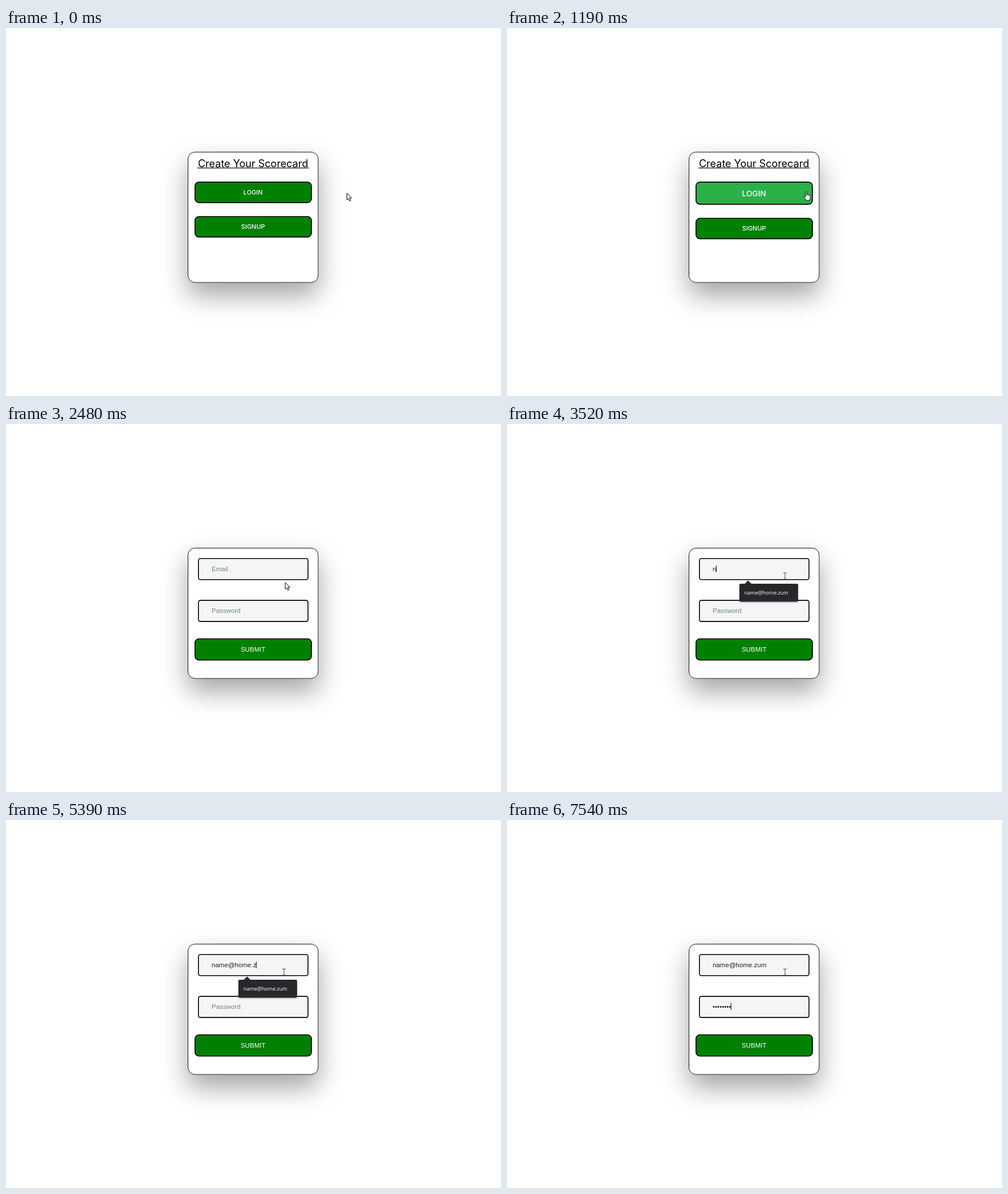
An HTML page with a canvas for the animation above (8 s loop, 869 px wide and 645 px high).

```html
<!DOCTYPE html>
<html lang="en">
<head>
<meta charset="utf-8">
<title>Scorecard sign-in</title>
<style>
html, body { margin: 0; width: 100%; height: 100%; overflow: hidden; background: #fff; }
canvas { display: block; width: 869px; height: 645px; }
</style>
</head>
<body>
<canvas id="stage"></canvas>
<script>
const W = 869, H = 645, LOOP = 8000;
const canvas = document.getElementById('stage');
const ratio = window.devicePixelRatio || 1;
canvas.width = W * ratio;
canvas.height = H * ratio;
const ctx = canvas.getContext('2d');

const ARIAL = '"Liberation Sans", Arial, sans-serif';
const ROUND = 'Inter, sans-serif';
const TIP = '"Open Sans", sans-serif';
const FIELD = `11.55px ${ARIAL}`;
const EMAIL = 'name@home.zum';
const FORM_AT = 2130, FOCUS_AT = 2960, TIP_OFF = 5860, TAB_AT = 6100;
const emailKeys = [3520, 3660, 3860, 3930, 4260, 4590, 4720, 4860, 4940, 5190, 5390, 5730, 5860];
const passKeys = [6400, 6540, 6740, 6860, 7070, 7190, 7330, 7540];

const clamp = v => Math.max(0, Math.min(1, v));
const mix = (a, b, p) => a + (b - a) * p;
const typed = (keys, t) => keys.filter(k => k <= t).length;

function box(x, y, w, h, r, fill, line, width) {
  ctx.beginPath();
  ctx.roundRect(x + width / 2, y + width / 2, w - width, h - width, r);
  ctx.fillStyle = fill;
  ctx.fill();
  if (!width) return;
  ctx.strokeStyle = line;
  ctx.lineWidth = width;
  ctx.stroke();
}

function label(text, x, y, font, color, align = 'left') {
  ctx.font = font;
  ctx.fillStyle = color;
  ctx.textAlign = align;
  ctx.fillText(text, x, y);
  return ctx.measureText(text).width;
}

function button(text, y, h, font, baseline, fill = '#008000') {
  box(331, y, 206, h, 7, fill, '#000', 1.6);
  label(text, 433.7, baseline, font, '#fff', 'center');
}

function card() {
  ctx.save();
  ctx.shadowColor = 'rgba(0,0,0,.36)';
  ctx.shadowBlur = 46 * ratio;
  ctx.shadowOffsetY = 22 * ratio;
  box(319, 217, 229.5, 229.5, 12, '#fff', '#000', 0);
  ctx.restore();
  box(319, 217, 229.5, 229.5, 12, '#fff', '#111', 1);
}

function welcome(hover) {
  label('Create Your Scorecard', 433.7, 243.5, `18px ${ROUND}`, '#000', 'center');
  ctx.fillStyle = '#000';
  ctx.fillRect(336, 244.8, 195.5, 1.2);
  const small = `500 11px ${ROUND}`;
  if (hover) button('LOGIN', 269.3, 40.4, `500 13.7px ${ROUND}`, 294.5, '#2bb04a');
  else button('LOGIN', 269.3, 37.6, small, 291.8);
  const drop = hover ? 3 : 0;
  button('SIGNUP', 329.7 + drop, 37.5, small, 352.2 + drop);
}

function field(y, h, value, hint, focused, baseline) {
  box(337, y, 194, h, 3.5, '#f5f5f5', '#000', 1.6);
  const wide = label(value || hint, 361, baseline, FIELD, value ? '#222' : '#6b8784');
  if (focused) {
    ctx.fillStyle = '#000';
    ctx.fillRect(Math.round(361 + (value ? wide : 0)) - 0.2, baseline - 10, 1, 12);
  }
}

function tooltip(alpha) {
  if (alpha <= 0) return;
  ctx.save();
  ctx.globalAlpha = alpha;
  ctx.shadowColor = 'rgba(0,0,0,.3)';
  ctx.shadowBlur = 3 * ratio;
  ctx.shadowOffsetY = ratio;
  box(408, 280, 103, 31.5, 2, '#26282c', '', 0);
  ctx.shadowColor = 'transparent';
  ctx.beginPath();
  ctx.moveTo(417, 280.5);
  ctx.lineTo(423.2, 274.3);
  ctx.lineTo(429.5, 280.5);
  ctx.fill();
  label(EMAIL, 416.8, 299.3, `9px ${TIP}`, '#fff');
  ctx.restore();
}

function form(t) {
  const email = EMAIL.slice(0, typed(emailKeys, t));
  const dots = '•'.repeat(typed(passKeys, t));
  field(235, 38.6, email, 'Email', t >= FOCUS_AT && t < TAB_AT, 258);
  field(308.3, 38.6, dots, 'Password', t >= TAB_AT, 331);
  button('SUBMIT', 375.7, 38.8, FIELD, 398.7);
  if (t >= FOCUS_AT) tooltip(1 - clamp((t - TIP_OFF) / 130));
}

const shapes = {
  arrow: new Path2D('M.5 .5V12.2L3.2 9.7 5.1 14.2 7.2 13.3 5.3 9H8.7Z'),
  hand: new Path2D('M-1 1.2Q-1 0 0 0T1.2 1.2V5.2Q2.2 4.5 3.3 5.7 4.5 5 5.4 6.4' +
    'Q7.4 6 7.4 8V11Q7.2 13 6.2 14V15.7H-.6V14.2Q-2 12.7-3.8 9.7-4.5 8.3-3.3 8-2.2 8-1 9.7Z'),
  beam: new Path2D('M-3-5.5H-.8L0-5 .8-5.5H3M0-5V5M-3 5.5H-.8L0 5 .8 5.5H3')
};

function pointer(kind, x, y) {
  ctx.save();
  ctx.translate(x, y);
  ctx.lineWidth = 1;
  ctx.lineJoin = 'round';
  ctx.strokeStyle = kind === 'beam' ? '#444' : '#000';
  if (kind !== 'beam') {
    ctx.fillStyle = '#fff';
    ctx.fill(shapes[kind]);
  }
  ctx.stroke(shapes[kind]);
  if (kind === 'hand') {
    ctx.lineWidth = 0.6;
    ctx.stroke(new Path2D('M1.2 5V8M3.3 6V8.3M5.4 6.6V8.6'));
  }
  ctx.restore();
}

// The pointer moves in discrete ticks.
function mouse(t) {
  if (t < FORM_AT) {
    const tick = t < 800 ? 0 : Math.min(12, Math.floor((t - 800) / 67 + 0.2) + 1);
    const p = 1 - Math.pow(1 - tick / 12, 1.44);
    const y = tick < 7 ? mix(289, 286.5, tick / 7) : mix(286.5, 287.5, (tick - 7) / 5);
    return { x: mix(598, 496.3, p), y, hover: tick >= 6 };
  }
  if (t >= 3180) return { x: 488, y: 266.5 };
  if (t >= 3120) return { x: 474, y: 260 };
  const tick = t < 2350 ? 0 : Math.min(6, Math.floor((t - 2350) / 68) + 1);
  const p = 1 - Math.pow(1 - tick / 6, 1.4);
  return { x: mix(496.3, 481, p), y: mix(287.5, 264, p) };
}

function draw(t) {
  ctx.setTransform(ratio, 0, 0, ratio, 0, 0);
  ctx.fillStyle = '#fff';
  ctx.fillRect(0, 0, W, H);
  card();
  const m = mouse(t);
  const onForm = t >= FORM_AT;
  if (onForm) form(t);
  else welcome(m.hover);
  const kind = onForm && m.y < 273 ? 'beam' : m.hover ? 'hand' : 'arrow';
  pointer(kind, m.x, m.y);
}

const start = performance.now();
function loop() {
  draw((performance.now() - start) % LOOP);
  requestAnimationFrame(loop);
}
loop();
</script>
</body>
</html>
```
